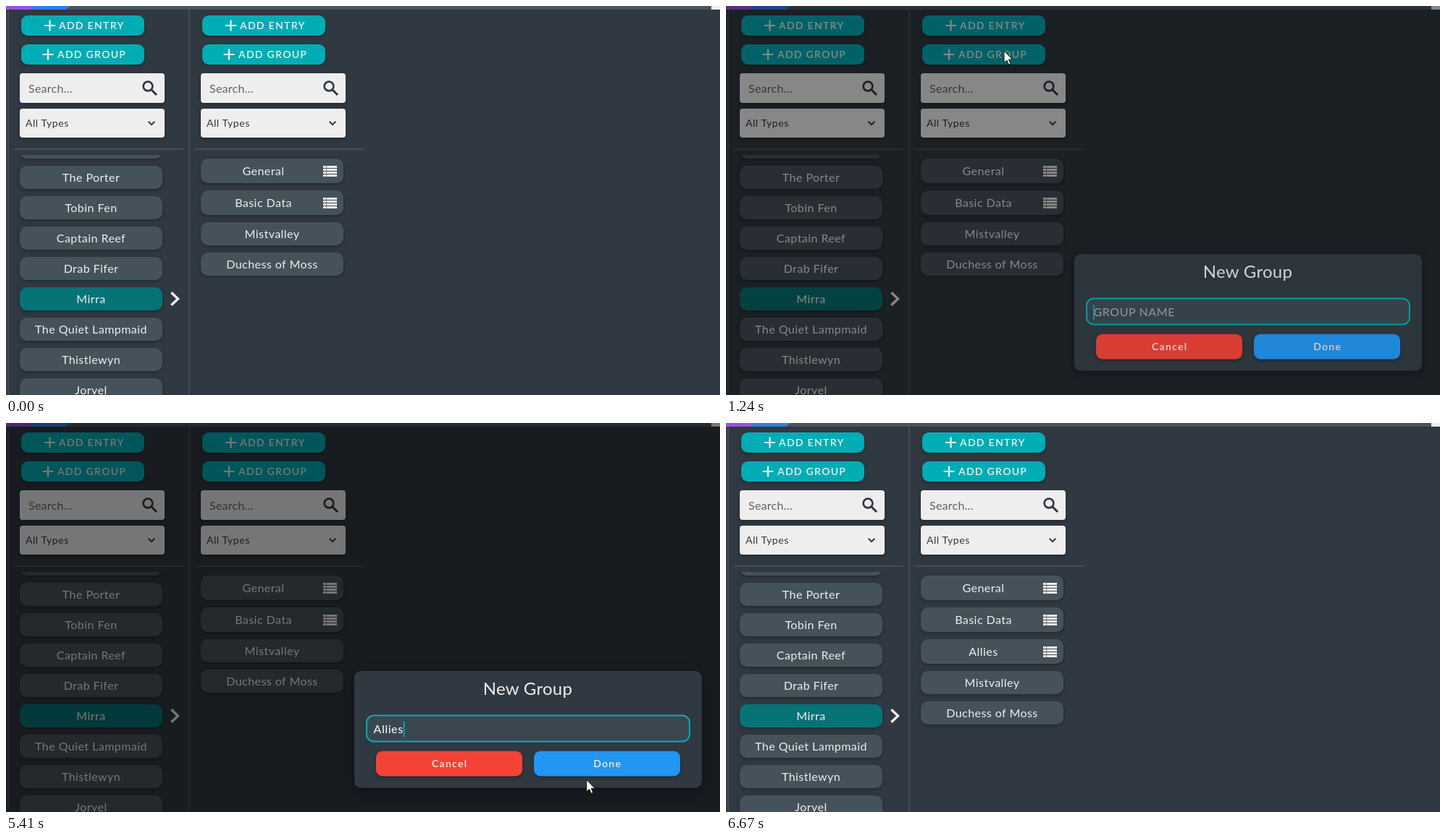
An HTML page for the animation above (7520 ms loop, 986 by 538 pixels).

```html
<!DOCTYPE html>
<html lang="en">
<head>
<meta charset="utf-8">
<title>New group dialog</title>
<style>
  html, body { margin: 0; width: 100%; height: 100%; overflow: hidden; background: #303841; }
  svg { display: block; position: absolute; left: 0; top: 0; }
  text { font-family: Lato, "Open Sans", sans-serif; fill: #eee; white-space: pre; }
  .item { font-size: 16px; letter-spacing: .45px; }
  .btn { font-size: 14px; font-weight: 600; letter-spacing: 1.3px; }
  .title { font-size: 24px; letter-spacing: .25px; }
  .field { font-size: 16px; letter-spacing: .6px; }
  .search { font-size: 16px; letter-spacing: .25px; fill: #5b6268; }
  .select { font-size: 14px; letter-spacing: .55px; fill: #303841; }
  .line { fill: none; }
  .raised { filter: drop-shadow(0 2px 2px rgba(0, 0, 0, .28)); }
  .card { filter: drop-shadow(0 4px 8px rgba(0, 0, 0, .4)); }
</style>
</head>
<body>
<svg width="986" height="538" viewBox="0 0 986 538">
  <defs>
    <clipPath id="listClip"><rect y="206" width="986" height="332"/></clipPath>
    <clipPath id="doneClip"><rect x="729" y="453.7" width="202" height="34.8" rx="9"/></clipPath>
  </defs>
  <rect width="986" height="538" fill="#303841"/>
  <g id="app"></g>
  <rect id="shade" width="986" height="538"/>
  <g id="dialog"></g>
  <path id="pointer" d="M0 0V16.5L3.8 13L6.4 19L9 17.9L6.4 12H11.5Z"
        fill="#fff" stroke="#111" stroke-linejoin="round"/>
</svg>
<script>
const LOOP = 7520;
const OPEN = 1070, FOCUS = 1120, DONE = 6110, SAVED = 6150;
const [app, shade, dialog, pointer] =
  ['app', 'shade', 'dialog', 'pointer'].map(id => document.getElementById(id));

function add(parent, tag, attrs, content) {
  const node = document.createElementNS('http://www.w3.org/2000/svg', tag);
  for (const key in attrs) node.setAttribute(key, attrs[key]);
  if (content) node.textContent = content;
  return parent.appendChild(node);
}
const box = (parent, x, y, width, height, rx, fill, cls = '') =>
  add(parent, 'rect', { x, y, width, height, rx, fill, class: cls });
const stroke = (parent, d, color, width) =>
  add(parent, 'path', { d, stroke: color, 'stroke-width': width, class: 'line' });
const label = (parent, x, y, cls, content, anchor = 'start') =>
  add(parent, 'text', { x, y, class: cls, 'text-anchor': anchor }, content);
const show = (node, visible) => { node.style.display = visible ? '' : 'none'; };

function item(parent, x, y, name, { group = false, active = false } = {}) {
  const g = add(parent, 'g', {});
  const h = group ? 34 : 32;
  box(g, x, y, 197, h, 10, active ? '#067377' : '#46525a', 'raised');
  label(g, x + (group ? 86.5 : 98.5), y + h / 2 + 5.5, 'item', name, 'middle');
  for (let row = 0; group && row < 4; row++) {
    const top = y + 10 + row * 4;
    box(g, x + 169, top, 4, 3, 0, '#eee');
    box(g, x + 173.6, top, 14.4, 3, 0, '#eee');
  }
  return g;
}

function addButton(x, y, name, plusX, textX) {
  box(app, x + 21, y, 170, 28, 9, '#00adb5', 'raised');
  stroke(app, `M${x + plusX - 7.5} ${y + 14}h15m-7.5 -7.5v15`, '#eee', 2.2);
  label(app, x + textX, y + 19, 'btn', name);
}

function column(x) {
  box(app, x + 2, 5, 2, 533, 0, '#434d56');
  addButton(x, 13, 'ADD ENTRY', 60.5, 73);
  addButton(x, 53, 'ADD GROUP', 58, 71);
  box(app, x + 19, 93, 200, 41, 4, '#eee', 'raised');
  label(app, x + 31, 120, 'search', 'Search...');
  add(app, 'circle', { cx: x + 196, cy: 111, r: 6.4, stroke: '#303841', 'stroke-width': 2.6, class: 'line' });
  stroke(app, `M${x + 200.5} 115.5l7.5 7.5`, '#303841', 3);
  box(app, x + 19, 142, 200, 40, 4, '#eee', 'raised');
  label(app, x + 27, 167, 'select', 'All Types');
  stroke(app, `M${x + 196.7} 159.8l4.3 4.3l4.3 -4.3`, '#303841', 2);
  box(app, x + 11, 197, 234, 2, 0, '#434d56');
}

function dialogButton(x, name, fill) {
  box(dialog, x, 453.7, 202, 34.8, 9, fill, 'raised');
  label(dialog, x + 101.7, 476.3, 'btn', name, 'middle');
}

box(app, 0, 0, 986, 5, 0, '#4a555d');
add(app, 'path', { d: 'M32 0H89L82 5H32Z', fill: '#2f80ed' });
add(app, 'path', { d: 'M0 0H39L33 5H0Z', fill: '#9b51e0' });
box(app, 974, 0, 12, 5, 0, '#eee');
column(0);
column(250);

const list = add(app, 'g', { 'clip-path': 'url(#listClip)' });
['', 'The Porter', 'Tobin Fen', 'Captain Reef', 'Drab Fifer', 'Mirra',
 'The Quiet Lampmaid', 'Thistlewyn', 'Jorvel'].forEach((name, i) =>
  item(list, 19, 179 + i * 42, name, { active: name === 'Mirra' }));
stroke(app, 'M228.3 396.3l9.2 8.7l-9.2 8.7', '#eee', 3.4);

item(app, 269, 211, 'General', { group: true });
item(app, 269, 255, 'Basic Data', { group: true });
const allies = item(app, 269, 299, 'Allies', { group: true });
const lower = add(app, 'g', {});
item(lower, 269, 299, 'Mistvalley');
item(lower, 269, 341, 'Duchess of Moss');

box(dialog, 481, 343, 480, 161.5, 9, '#303841', 'card');
label(dialog, 720.5, 375.5, 'title', 'New Group', 'middle');
const field = box(dialog, 498, 404.5, 446, 36, 10, '#3a4750');
field.setAttribute('stroke-width', 2);
const entry = label(dialog, 507.5, 428.5, 'field', '');
const caret = box(dialog, 507, 413, 1.8, 21, 0, '#00adb5');
dialogButton(511, 'Cancel', '#f44336');
dialogButton(729, 'Done', '#2196f3');
const ripple = add(add(dialog, 'g', { 'clip-path': 'url(#doneClip)' }), 'circle',
  { cx: 828.5, cy: 469, r: 0, fill: '#fff', 'fill-opacity': .17 });

const progress = (t, start, length) => Math.min(1, Math.max(0, (t - start) / length));
const smooth = u => u * u * (3 - 2 * u);
const easeOut = u => 1 - (1 - u) ** 2.4;
const fade = (t, closing) =>
  smooth(progress(t, OPEN, 220)) - smooth(progress(t, DONE, closing));

// Pointer strokes; "via" bends the path
const moves = [
  { start: 70, end: 920, from: [883, 514], to: [384, 62] },
  { start: 1300, end: 1770, from: [384, 62], to: [544, 325] },
  { start: 5110, end: 5720, from: [544, 325], via: [779, 568], to: [828, 467] },
  { start: 6280, end: 6600, from: [828, 467], to: [870, 545] },
];

function pointerAt(t) {
  const { start, end, from, via, to } = moves.findLast(move => t >= move.start) || moves[0];
  const p = easeOut(progress(t, start, end - start));
  return from.map((a, i) => {
    const mid = via ? via[i] : (a + to[i]) / 2;
    return a * (1 - p) ** 2 + 2 * mid * p * (1 - p) + to[i] * p * p;
  });
}

const WORD = 'Allies';
const keyTimes = [3080, 3550, 3780, 4030, 4170, 4400];

let shown;
function setText(value) {
  if (value === shown) return;
  shown = value;
  entry.textContent = value || 'GROUP NAME';
  entry.style.fill = value ? '#fff' : '#a3aab0';
  caret.setAttribute('x', value ? 507.5 + entry.getComputedTextLength() : 507);
}

function render(t) {
  shade.setAttribute('opacity', .5 * fade(t, 290));
  dialog.setAttribute('opacity', fade(t, 220));

  const saved = t >= SAVED;
  show(allies, saved);
  lower.setAttribute('transform', `translate(0 ${saved ? 44 : 0})`);

  const typed = keyTimes.filter(time => time <= t);
  setText(WORD.slice(0, typed.length));
  const focused = t >= FOCUS && t < DONE;
  const sinceKey = t - (typed.at(-1) || FOCUS);
  show(caret, focused && sinceKey % 1000 < 500);
  field.setAttribute('stroke', t < DONE ? '#00adb5' : '#3a4750');
  ripple.setAttribute('r', 130 * progress(t, DONE, 140));

  show(pointer, t >= moves[0].start && t < moves.at(-1).end);
  pointer.setAttribute('transform', `translate(${pointerAt(t)})`);
}

function tick() {
  render(performance.now() % LOOP);
  requestAnimationFrame(tick);
}
tick();
</script>
</body>
</html>
```
